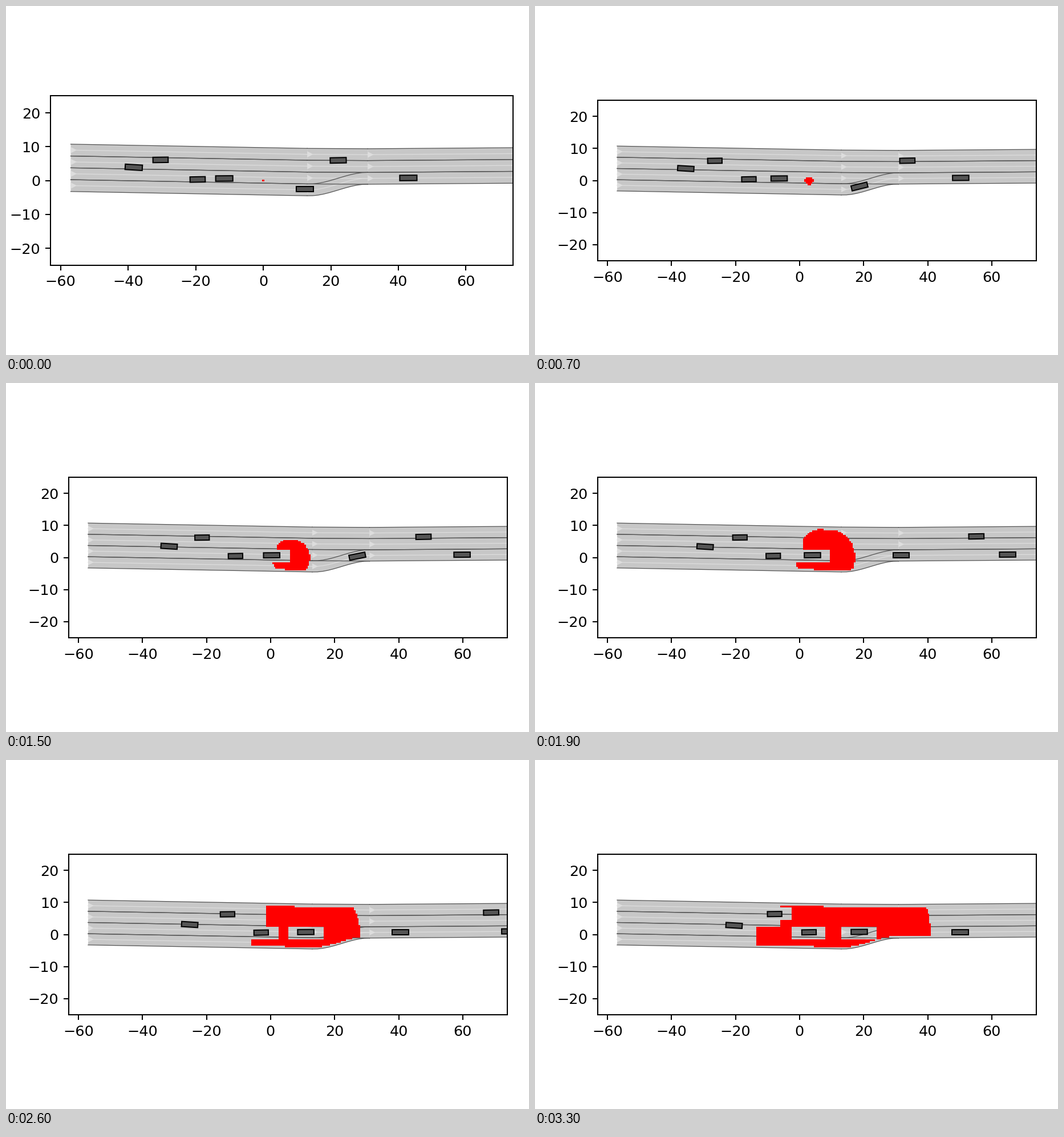
A matplotlib script that plays this animation: 917 by 611 pixels, repeating every 3.4 s.

```python
import numpy as np
import matplotlib.pyplot as plt
from matplotlib.animation import FuncAnimation
from matplotlib.collections import PolyCollection
from matplotlib.patches import Polygon

W, H, DPI = 917, 611, 128
FRAMES, INTERVAL = 34, 100
SCALE = 183.4 / DPI                # enlarges the default point sizes
THIN = 0.5 * SCALE
ROAD, BOUND, LIGHT = "#c7c7c7", "#555555", "#dddddd"
X_LIM, Y_LIM = (-63, 74), (-25, 25)

fig = plt.figure(figsize=(W / DPI, H / DPI), dpi=DPI, facecolor="white")
ax = fig.add_axes([0.1, 0.1, 0.8, 0.8], xlim=X_LIM, ylim=Y_LIM)
ax.set_xticks(range(-60, 61, 20))
ax.set_yticks(range(-20, 21, 10))
ax.tick_params(labelsize=10 * SCALE, width=0.8 * SCALE,
               length=3.5 * SCALE, pad=3.5 * SCALE)
ax.spines[:].set_linewidth(0.8 * SCALE)


def place_axes(left, right):
    """Same scale on both axes, centred vertically on the stage."""
    width = right - left
    height = width * np.ptp(Y_LIM) / np.ptp(X_LIM)
    bottom = (H - height) / 2 - 0.05
    ax.set_position([left / W, bottom / H, width / W, height / H])


# --- road -----------------------------------------------------------------

LANE = 3.5
KNOTS = (-57, 13, 30.9, 80)
MERGE = (13.7, 30.7)


def road_top(x):
    return np.interp(x, KNOTS, (10.75, 9.5, 9.4, 9.75))


def merge_share(x):
    """Smooth step from the ending lane into its neighbour."""
    u = np.clip((x - MERGE[0]) / (MERGE[1] - MERGE[0]), 0, 1)
    return u * u * (3 - 2 * u)


def road_bottom(x):
    return road_top(x) - LANE * (4 - merge_share(x))


def lanelet(x, left):
    right, mid = left - LANE, left - LANE / 2
    ax.fill(np.r_[x, x[::-1]], np.r_[left, right[::-1]], fc=ROAD, ec="none", zorder=1)
    for y in (left, right):
        ax.plot(x, y, color=BOUND, lw=THIN, zorder=1.4)
    ax.plot(x, mid, color=LIGHT, lw=THIN, zorder=1.3)
    ax.fill(x[0] + np.array([0, 1.8, 0]), mid[0] + np.array([0.9, 0, -0.9]),
            fc=LIGHT, ec="none", zorder=1.3)


for i in range(3):
    span = np.array(KNOTS[i:i + 2], float)
    for k in range(4 if i == 0 else 3):
        lanelet(span, road_top(span) - LANE * k)
bend = np.linspace(KNOTS[1], KNOTS[2], 12)
lanelet(bend, road_bottom(bend) + LANE)
ax.set(xlim=X_LIM, ylim=Y_LIM)

# --- vehicles -------------------------------------------------------------

CAR_WIDTH = 1.6


class Car:
    def __init__(self, length, x, y, speed, gain, slope, rise=0):
        self.half = length / 2
        self.x0, self.y0 = x, y
        self.speed, self.gain = speed, gain
        self.slope, self.rise = slope, rise
        self.patch = ax.add_patch(Polygon(self.corners(0), fc=BOUND, ec="black",
                                          lw=0.8 * SCALE, zorder=2.2))

    def x(self, t):
        return self.x0 + self.speed * t + self.gain * t * t

    def y(self, x):
        return self.y0 + self.slope * (x - self.x0) + self.rise * merge_share(x)

    def corners(self, t):
        x = self.x(t)
        heading = np.arctan((self.y(x + 0.05) - self.y(x - 0.05)) / 0.1)
        c, s = np.cos(heading), np.sin(heading)
        box = np.array([(-1, -1), (1, -1), (1, 1), (-1, 1)]) * (self.half, CAR_WIDTH / 2)
        return box @ np.array([(c, s), (-s, c)]) + (x, self.y(x))


cars = [
    Car(4.75, 22.18, 5.97, 1.58, 0.0083, 0.019),
    Car(4.5, -30.42, 6.10, 0.53, 0.0047, 0.013),
    Car(5.08, -38.35, 3.91, 0.36, 0.0055, -0.060),
    Car(4.5, -19.44, 0.32, 0.47, 0.0063, 0.017),
    Car(5.08, -11.56, 0.61, 0.69, 0.0068, 0.007),
    Car(5.08, 12.30, -2.55, 0.85, 0.0090, 0, rise=3.35),
    Car(5.08, 42.94, 0.77, 0.99, 0.0089, 0.007),
]

# --- reachable area -------------------------------------------------------

CELL = 0.5
COLS = np.arange(-20, 45, CELL) + CELL / 2
ROWS = np.arange(-5, 10, CELL) + CELL / 2
GX, GY = np.meshgrid(COLS, ROWS)
ON_ROAD = (GY > road_bottom(GX) + 0.6) & (GY < road_top(GX) - 0.85)


def reachable(t):
    """Growing ellipse on the road, clear of the vehicles and their margins."""
    front = 0.47 * t + 0.0234 * t * t
    rear = 0.406 * t - 0.0249 * t * t
    rear_left_lanes = 0.406 * t - 0.018 * t * t
    rx, ry = (front - rear) / 2 + 1e-9, 0.0256 * t * t + 1e-9
    mask = ((GX - (front + rear) / 2) / rx) ** 2 + ((GY + 0.1) / ry) ** 2 <= 1
    mask &= ON_ROAD & ((GY < 2.5) | (GX > rear_left_lanes))
    for car in cars:
        x = car.x(t)
        dy = GY - car.y(x)
        mask &= (abs(GX - x) > car.half + 3.05) | (dy < -2.1) | (dy > 1.9)
    return mask


def rect(x0, x1, y):
    y0, y1 = y - CELL / 2, y + CELL / 2
    return [(x0, y0), (x1, y0), (x1, y1), (x0, y1)]


def row_spans(t):
    spans = []
    for y, row in zip(ROWS, reachable(t)):
        ends = np.flatnonzero(np.diff(np.r_[0, row.astype(int), 0]))
        for a, b in ends.reshape(-1, 2):
            spans.append(rect(COLS[a] - CELL / 2, COLS[b - 1] + CELL / 2, y))
    x = 0.42 * t
    return spans or [rect(x - 0.35, x + 0.35, -0.1 * t)]


area = PolyCollection([], facecolors="red", linewidths=0, antialiaseds=False, zorder=2)
ax.add_collection(area, autolim=False)


def update(t):
    # the layout tightens once, after the opening picture
    place_axes(*((78, 889.4) if t == 0 else (110.3, 879.4)))
    for car in cars:
        car.patch.set_xy(car.corners(t))
    area.set_verts(row_spans(t))
    return [area, *(car.patch for car in cars)]


anim = FuncAnimation(fig, update, frames=FRAMES, interval=INTERVAL,
                     init_func=lambda: update(0), repeat=True, repeat_delay=0)
plt.show()
```
